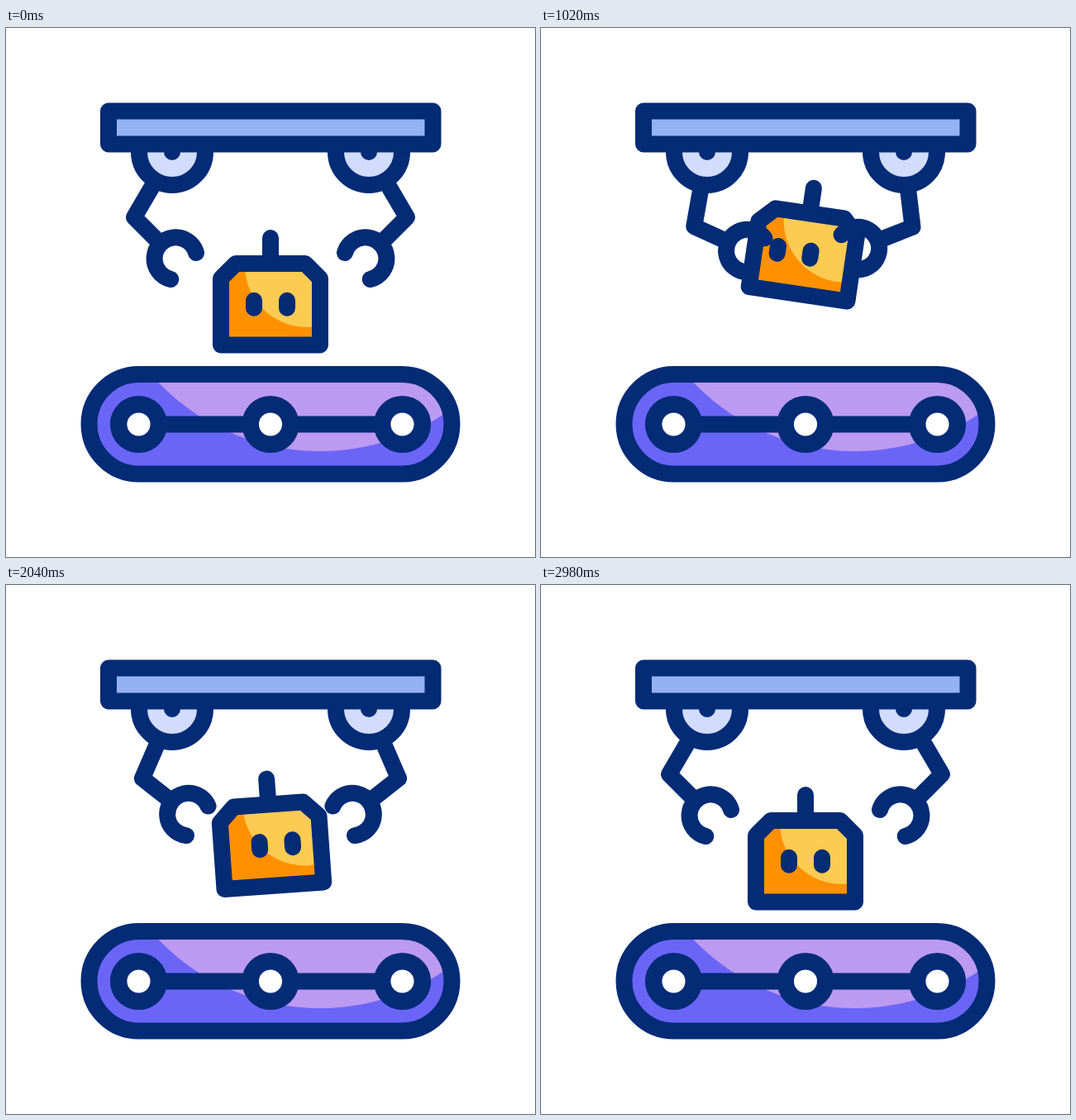
Recreate the animation shown at these times as an HTML page. Size 640 px wide and 640 px high, loop 3000 ms.

```html
<!DOCTYPE html>
<html lang="en">
<head>
<meta charset="utf-8">
<title>Robot assembly line</title>
<style>
  html, body { margin: 0; width: 100%; height: 100%; overflow: hidden; background: #fff; }
  svg { display: block; width: 100vw; height: 100vh; }
  .line { fill: none; stroke: #032b76; stroke-width: 20; stroke-linecap: round; stroke-linejoin: round; }
  .navy { fill: #032b76; }
</style>
</head>
<body>
<svg viewBox="0 0 640 640">
  <defs>
    <path id="shell" d="M260 383.5V303L278 285H362L380 303V383.5Z"/>
    <rect id="belt" x="100.5" y="419" width="439" height="120.5" rx="60.25"/>
    <clipPath id="shellClip"><use href="#shell"/></clipPath>
    <clipPath id="beltClip"><use href="#belt"/></clipPath>
    <path id="arm" class="line" d="M181 184.6L155 229L187 261M230 272A25.7 25.7 0 1 0 199.3 304"/>
    <g id="lamp">
      <path d="M161 140V150A40 40 0 0 0 241 150V140Z" fill="#d2dcfd"/>
      <path class="line" d="M161 140V150A40 40 0 0 0 241 150V140"/>
      <circle class="navy" cx="201" cy="150" r="10"/>
    </g>
    <g id="wheel">
      <circle class="line" cy="479.5" r="24.3" style="fill:#fff;stroke-width:20.5"/>
    </g>
  </defs>

  <g id="conveyor">
    <use href="#belt" fill="#6b65f7"/>
    <circle cx="380" cy="240" r="272" fill="#bc9af1" clip-path="url(#beltClip)"/>
    <use href="#belt" class="line"/>
    <path class="line" d="M160.5 479.5H479.5"/>
    <use href="#wheel" x="160.5"/>
    <use href="#wheel" x="320"/>
    <use href="#wheel" x="479.5"/>
  </g>

  <g id="robot">
    <path class="line" d="M320 254V285"/>
    <use href="#shell" fill="#ff9100"/>
    <circle cx="364" cy="287" r="75" fill="#fccb52" clip-path="url(#shellClip)"/>
    <use href="#shell" class="line"/>
    <path id="eyes" class="line" d="M300 329.7V338.7M340 329.7V338.7"/>
  </g>

  <g id="left"><use href="#arm"/></g>
  <g transform="translate(640) scale(-1 1)"><g id="right"><use href="#arm"/></g></g>

  <use href="#lamp"/>
  <use href="#lamp" transform="translate(640) scale(-1 1)"/>
  <rect class="line" x="124" y="100.5" width="392.5" height="40" style="fill:#94b1f2"/>
</svg>
<script>
  const LOOP = 3000;
  const PIVOT_Y = 322;

  // Steps of [time in ms, value], eased between neighbours.
  const lift = [[0, 0], [667, 1], [1730, 1], [2230, 0]];
  const tilt = [[667, 0], [1250, 1], [1300, 1], [1730, -1], [2230, 0]];
  const sway = [[850, 0], [1330, 1], [1730, 0]];

  const ease = u => u * u * (3 - 2 * u);

  function valueAt(steps, t) {
    if (t <= steps[0][0]) return steps[0][1];
    for (let i = 1; i < steps.length; i++) {
      const [t0, a] = steps[i - 1], [t1, b] = steps[i];
      if (t < t1) return a + (b - a) * ease((t - t0) / (t1 - t0));
    }
    return steps[steps.length - 1][1];
  }

  const place = (id, value) => document.getElementById(id).setAttribute("transform", value);

  function draw(t) {
    const up = valueAt(lift, t), lean = valueAt(tilt, t), push = valueAt(sway, t);
    place("robot", `translate(0 ${-61 * up}) rotate(${12.7 * lean} 320 ${PIVOT_Y})`);
    place("eyes", `translate(${-18.6 * lean} 0)`);
    place("left", `rotate(${-21.7 * up + 4.8 * push} 201 150)`);
    place("right", `rotate(${-21.7 * up - 6.5 * push} 201 150)`);
  }

  const start = performance.now();
  function tick() {
    draw((performance.now() - start) % LOOP);
    requestAnimationFrame(tick);
  }
  draw(0);
  requestAnimationFrame(tick);
</script>
</body>
</html>
```
